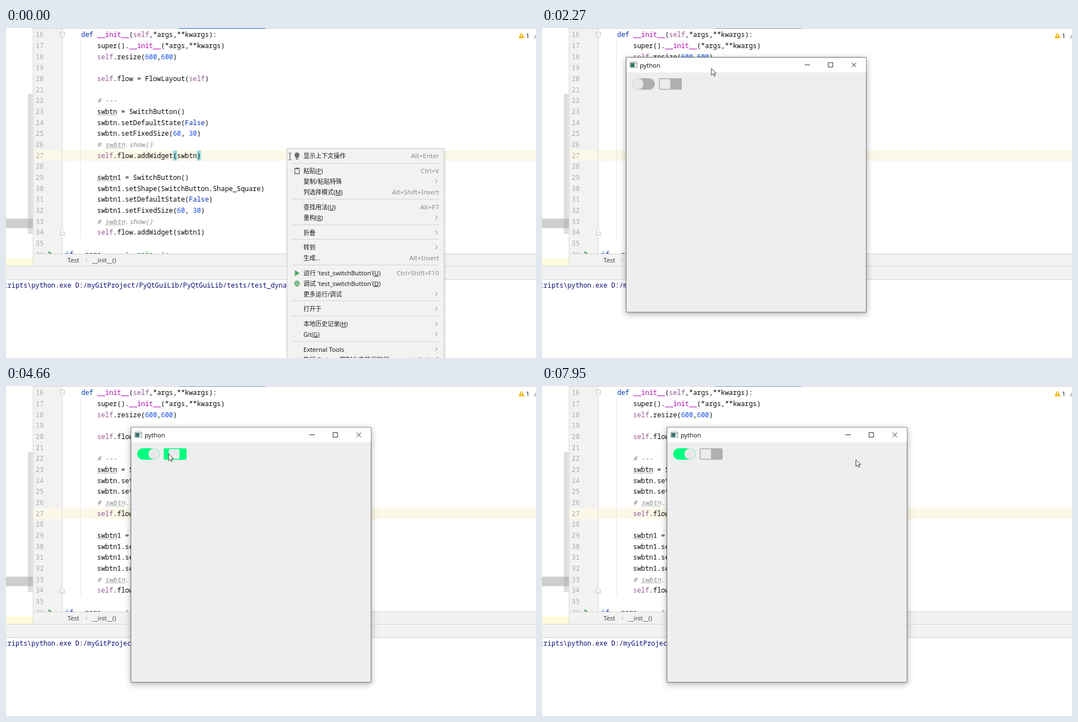
Recreate the animation shown at these times as an HTML page. Size 948x591 px, loop 7.99 s.

```html
<!DOCTYPE html>
<html lang="zh">
<head>
<meta charset="utf-8">
<style>
html, body { margin: 0; width: 100%; height: 100%; overflow: hidden; background: #fff; }
svg { display: block; width: 948px; height: 591px; }
text { white-space: pre; font: 11.1px "Noto Sans", "Noto Sans CJK SC", sans-serif; fill: #1c1c1c; }
.code, .code text { font: 11.9px "Noto Sans Mono", monospace; fill: #0a0a0a; }
.code .num { fill: #adadad; }
.def { fill: #b200b2; } .self { fill: #94558d; } .key { fill: #0033b3; }
.lit { fill: #1750eb; } .str { fill: #067d17; } .rem { fill: #8c8c8c; font-style: italic; }
.code .out { fill: #0c0c78; }
.item text { font-size: 10.8px; }
.item .latin { font-size: 11.1px; }
.item .hint { font-size: 11.5px; fill: #8a8a8a; text-anchor: end; }
.item .bar { fill: none; }
.item .arrow { stroke: #777; fill: none; }
.item.on .bar { fill: #2675bf; }
.item.on text { fill: #fff; }
.item.on .arrow { stroke: #fff; }
.u { text-decoration: underline; }
#win { filter: drop-shadow(0 3px 6px rgba(0,0,0,.32)); }
</style>
</head>
<body>
<svg viewBox="0 0 948 591">
  <defs><clipPath id="pane"><path d="M0 0H948V404H0Z"/></clipPath></defs>
  <g id="editor" clip-path="url(#pane)">
    <path fill="#f2f2f2" d="M49 0H100V404H49Z"/>
    <path fill="#fcf8e8" d="M49 219H948V238H49Z"/>
    <path stroke="#d6d6d6" d="M100.5 0V404"/>
    <path stroke="#e6e6e6" d="M133.5 22V376"/>
    <path fill="#93d9d9" d="M299 219.5h7v18h-7zM341.700 219.5h7v18h-7z"/>
    <g fill="#fff" stroke="#bdbdbd">
      <path d="M96.500 7.500h8v6l-4 4l-4-4zM98.500 11.500h4"/>
      <path d="M96.500 370.500h8v-6l-4-4l-4 4zM98.500 366.500h4"/>
    </g>
    <path fill="#59a869" d="M76 399.500l8 5.500l-8 5z"/>
    <g id="lines" class="code"></g>
    <path id="caret" stroke="#000" stroke-width="1.500" d="M349 220V237"/>
    <path stroke="#cfcfcf" d="M49 .5H948"/>
    <path id="tab" stroke-width="1.600" d="M309 .5H464"/>
    <path fill="#f2b90d" d="M922 8l5.500 10.500h-11z"/>
    <path stroke="#fff" stroke-width="1.300" d="M922 11.500v3.500m0 1v1.300"/>
    <path fill="#c9c9b5" d="M949 9l5 9.500h-11z"/>
    <text x="930" y="18">1</text>
  </g>
  <path fill="#dfdfdf" d="M39 118h8.500v251H39z"/>
  <path fill="#cecece" d="M0 341.500h48v17H0z"/>
  <path fill="#bfbfbf" d="M39 341.500h8.500v17H39z"/>
  <path fill="#fffbdc" d="M0 412.500h48v13H0z"/>
  <path fill="#f2f2f2" d="M49 404H948V426H49zM0 427H948V450H0z"/>
  <path stroke="#d3d3d3" d="M48.500 0V426M49 404.500H948M0 426.500H948M0 450.500H948"/>
  <text x="110" y="420" style="fill:#444">Test</text>
  <path fill="none" stroke="#999" d="M142.500 413l2.500 2.500l-2.500 2.500"/>
  <text x="154" y="420" style="fill:#444">__init__()</text>
  <g class="code"><text id="out" class="out" x="-4.500" y="465.300"></text></g>
  <g id="menu">
    <path fill="#000" opacity=".06" d="M506 218H787V591H506z"/>
    <path fill="#f2f2f2" stroke="#c6c6c6" d="M502.500 215.500H783.500V600H502.500z"/>
    <g id="items"></g>
    <path fill="#6e6e6e" d="M520.500 223a4.500 4.500 0 0 1 2.500 8.200v1.800h-5v-1.800a4.500 4.500 0 0 1 2.500-8.200zM518 234h5v1.500h-5z"/>
    <path fill="none" stroke="#6e6e6e" stroke-width="1.400" d="M516.500 251.500h8v9.500h-8z"/>
    <path fill="#6e6e6e" d="M518 250h5v3h-5z"/>
    <path fill="#59a869" d="M516.500 433.500l9 5.500l-9 5.500z"/>
    <path fill="#59a869" stroke="#59a869" d="M517.500 454.500h6v6l-3 2.500l-3-2.500zM518 452.500h5M515 454.500l2 1M526 454.500l-2 1M514.500 458h12M515 462l2.500-1.500M526 462l-2.500-1.500"/>
    <path stroke="#f2f2f2" d="M518.500 457h4m-4 2.500h4"/>
  </g>
  <g id="win">
    <path fill="#eee" stroke="#6f6f6f" d="M0 0H429.500V456.500H0z"/>
    <path fill="#fff" d="M.5 .5H429V27H.5z"/>
    <path fill="#fff" stroke="#8d9494" d="M7 8.500h12.500v9.500H7z"/>
    <path fill="#33736b" d="M8 10h7v7.500H8z"/>
    <path fill="#9fb5b5" d="M16 10h2.500v3H16z"/>
    <text x="24.500" y="18">python</text>
    <path fill="none" stroke="#222" d="M319.500 13.500h9.500M361.500 9.500h8v8h-8zM403.500 9.500l8 8m0-8l-8 8"/>
    <rect id="track1" x="11" y="37.500" width="40.500" height="20.500" rx="10.250"/>
    <circle id="knob1" cy="47.750" r="9.900" fill="#e8e8e8"/>
    <rect id="track2" x="58.500" y="37.500" width="41" height="20.500" rx="2"/>
    <rect id="knob2" y="39" width="19" height="17.500" rx="1.500" fill="#ebebeb"/>
  </g>
  <g id="cursor" fill="#fff" stroke="#222" stroke-width=".9"><path id="shape"/></g>
</svg>
<script>
const $ = id => document.getElementById(id);
const LOOP = 7990;

const code = `    def __init__(self,*args,**kwargs):
        super().__init__(*args,**kwargs)
        self.resize(600,600)

        self.flow = FlowLayout(self)

        # ---
        swbtn = SwitchButton()
        swbtn.setDefaultState(False)
        swbtn.setFixedSize(60, 30)
        # swbtn.show()
        self.flow.addWidget(swbtn)

        swbtn1 = SwitchButton()
        swbtn1.setShape(SwitchButton.Shape_Square)
        swbtn1.setDefaultState(False)
        swbtn1.setFixedSize(60, 30)
        # swbtn.show()
        self.flow.addWidget(swbtn1)

if __name__ == '__main__':`.split('\n');

function tint(m) {
  const kind = m[0] === '#' ? 'rem' : m[0] === "'" ? 'str' : m === 'self' ? 'self' :
    m === '__init__' ? 'def' : /\d/.test(m) ? 'lit' : 'key';
  return `<tspan class="${kind}">${m}</tspan>`;
}
const token = /#.*|__init__|\bself\b|\b(?:def|False|if)\b|\b\d+\b|'.*?'/g;
$('lines').innerHTML = code.map((line, i) => {
  const y = 16.2 + i * 19.67;
  const typo = /^ +(# )?swbtn( =|1 =|\.show)/.exec(line);
  const x = typo && typo[1] ? 177.4 : 163;
  return `<text class="num" x="53" y="${y}">${i + 16}</text><text x="106" y="${y}">${line.replace(token, tint)}</text>` +
    (typo ? `<path stroke="#a9b7a0" d="M${x} ${y + 2}h36"/>` : '');
}).join('');

// Menu rows: centre, label, shortcut ('>' opens a submenu)
const rows = [
  [229, '显示上下文操作', 'Alt+Enter'], [256, '粘贴(P)', 'Ctrl+V'], [275, '复制/粘贴特殊', '>'],
  [294, '列选择模式(M)', 'Alt+Shift+Insert'], [321, '查找用法(U)', 'Alt+F7'], [339.5, '重构(R)', '>'],
  [366.5, '折叠', '>'], [393, '转到', '>'], [412, '生成...', 'Alt+Insert'],
  [439, "运行 'test_switchButton'(U)", 'Ctrl+Shift+F10'], [457.5, "调试 'test_switchButton'(D)", ''],
  [476.5, '更多运行/调试', '>'], [503, '打开于', '>'], [530, '本地历史记录(H)', '>'], [548.5, 'Git(G)', '>'],
  [575.5, 'External Tools', '>'], [594, '执行 Python 控制台中的代码行', 'Alt+Shift+E']
];
$('items').innerHTML = rows.map(([y, label, hint]) => `<g class="item">
  <path class="bar" d="M503 ${y - 9.3}h280v18.600h-280z"/>
  <text x="532" y="${y + 4}" class="${/[a-z]{3}/.test(label) ? 'latin' : ''}">${
    label.replace(/\((.)\)$/, '(<tspan class="u">$1</tspan>)')}</text>${
  hint === '>' ? `<path class="arrow" d="M768 ${y - 4}l3.500 3.500l-3.500 3.500"/>`
    : `<text class="hint" x="774.500" y="${y + 4}">${hint}</text>`}</g>`).join('') +
  [243, 307, 353, 379, 425, 489, 516, 562].map(y => `<path stroke="#d2d2d2" d="M512 ${y - .5}H775"/>`).join('');
const items = [...document.querySelectorAll('.item')];

// Pointer path: time, x, y
const path = [
  [40, 508, 230], [200, 522, 290], [420, 532, 390], [610, 533, 444], [810, 537, 444], [1300, 537, 444],
  [1400, 533.5, 436], [1600, 533.5, 436], [2230, 303, 72.5], [2290, 303, 72.5], [2390, 349, 91],
  [2430, 369, 92.5], [2470, 375, 93], [2510, 376, 94], [3120, 255, 120], [3240, 255, 120],
  [3440, 257, 124], [3610, 268, 155.5], [3700, 268, 155.5], [3970, 256, 124], [4220, 256, 124],
  [4520, 290, 120], [4700, 291, 122], [4990, 286, 118], [5070, 274, 118], [5230, 274, 118],
  [5310, 256, 120], [5440, 256, 121], [5700, 294, 134], [5880, 294, 128], [6120, 294, 128],
  [6310, 297, 120], [6500, 298, 121], [6890, 278, 121], [7030, 256, 120], [7300, 256, 122],
  [7700, 452, 138], [7950, 561.5, 132]
];
const clamp = v => Math.min(1, Math.max(0, v));
function pointer(t) {
  const i = path.findIndex(k => k[0] > t);
  if (i < 0) return path[path.length - 1].slice(1);
  if (i === 0) return path[0].slice(1);
  const [t0, x0, y0] = path[i - 1], [t1, x1, y1] = path[i];
  const p = (t - t0) / (t1 - t0), e = p * p * (3 - 2 * p);
  return [x0 + (x1 - x0) * e, y0 + (y1 - y0) * e];
}

const shapes = {
  beam: 'M-2.500 -6h2m1 0h2M-2.500 6h2m1 0h2M0 -5.500V5.500',
  arrow: 'M0 0V12L2.800 9.400L4.800 13.600L6.800 12.700L4.900 8.600H8.500Z',
  size: 'M0 -8.500L3.500 -4.500H1V4.500H3.500L0 8.500L-3.500 4.500H-1V-4.500H-3.500Z'
};
const within = (t, a, b) => t >= a && t < b;

function toggle(n, t, clicks) {
  const past = clicks.filter(c => c <= t), on = past.length % 2;
  const p = past.length ? clamp((t - past[past.length - 1]) / 250) : 1;
  $('track' + n).setAttribute('fill', on ? '#00ff7f' : '#afafaf');
  return on ? p : 1 - p;
}

function draw(t) {
  const [x, y] = pointer(t);
  const shape = t < 40 ? 'beam' : within(t, 810, 1330) || within(t, 5640, 5900) ? 'size' : 'arrow';
  $('shape').setAttribute('d', shapes[shape]);
  $('cursor').setAttribute('transform', `translate(${x} ${y})`);

  $('menu').style.display = t < 810 ? '' : 'none';
  items.forEach((el, i) => el.classList.toggle('on', i > 0 && t >= 40 && Math.abs(y - rows[i][0]) < 9.3));
  $('caret').style.display = within(t, 810, 970) ? '' : 'none';
  $('tab').setAttribute('stroke', t < 970 ? '#3c78d2' : '#9ca6b5');
  $('out').textContent = within(t, 930, 970) ? '' :
    `cripts\\python.exe D:/myGitProject/PyQtGuiLib/PyQtGuiLib/tests/test_${t < 930 ? 'dynamicTLine' : 'switchButton'}.py`;

  // The window fades in, then follows the pointer while dragged
  const show = 1 - (1 - clamp((t - 1330) / 180)) ** 3, scale = .96 + .04 * show;
  const [dx, dy] = t < 2290 ? [303, 72.5] : pointer(Math.min(t, 2510));
  $('win').style.display = t > 1330 ? '' : 'none';
  $('win').setAttribute('opacity', show);
  $('win').setAttribute('transform', `translate(${dx - 152.5 + 214.75 * (1 - scale)} ${dy - 20 + 228.25 * (1 - scale)}) scale(${scale})`);

  $('knob1').setAttribute('cx', 21.2 + 20 * toggle(1, t, [3280, 5330, 7060]));
  $('knob2').setAttribute('x', 60 + 19.3 * toggle(2, t, [4560, 6350]));
}

let start;
function frame(now) {
  start ??= now;
  draw((now - start) % LOOP);
  requestAnimationFrame(frame);
}
draw(0);
requestAnimationFrame(frame);
</script>
</body>
</html>
```
